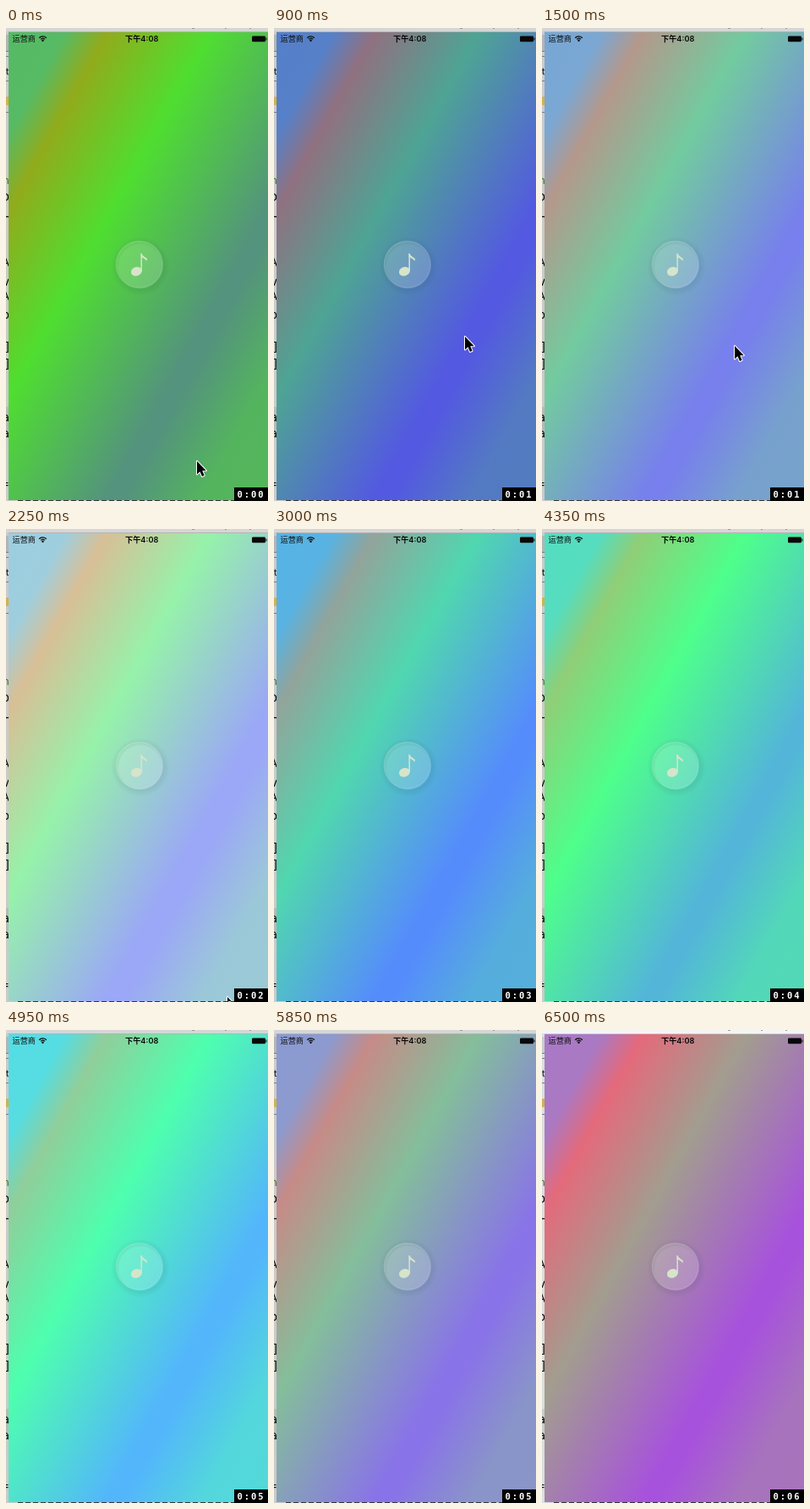
Recreate the animation shown at these times as an HTML page with a canvas. Size 310x558 px, loop 6.6 s.

```html
<!DOCTYPE html>
<html lang="zh">
<head>
<meta charset="utf-8">
<title>Colour player</title>
<style>
html, body { margin: 0; width: 100%; height: 100%; overflow: hidden; background: #ccc; }
canvas { display: block; }
</style>
</head>
<body>
<canvas id="stage" width="310" height="558"></canvas>
<script>
const ctx = document.getElementById('stage').getContext('2d');
const LOOP = 6600, LAST = 6500, STEP = 150;
const X = 3, Y = 5, W = 307, H = 552;
const CJK = '"Noto Sans CJK SC", "Noto Sans CJK", sans-serif';

// Backdrop colours; a null entry takes the mean of its neighbours.
const tones = [
  [0, [79, 145, 48]], [450, null], [900, [78, 87, 148]], [1350, null],
  [1950, [150, 165, 170]], [2400, null], [2850, [80, 138, 175]], [3450, null],
  [3900, [78, 180, 104]], [4350, null], [4950, [78, 180, 174]],
  [5400, [105, 147, 164]], [5850, [132, 113, 155]], [6500, [162, 80, 143]]
];
tones.forEach((tone, i) => {
  if (!tone[1]) tone[1] = tones[i - 1][1].map((c, k) => (c + tones[i + 1][1][k]) / 2);
});

// Tint added to the backdrop along the diagonal.
const tints = [
  [0, [6, 41, 54]], [0.11, [8, 41, 52]], [0.19, [66, 26, -20]],
  [0.39, [0, 77, 0]], [0.685, [5, 2, 77]], [0.72, [5, 2, 77]],
  [0.87, [5, 35, 46]], [1, [5, 37, 43]]
];

const clockTimes = [900, 1950, 3000, 3900, 4950, 6000];
const pointerPath = [
  [0, 226, 511], [450, 226, 440], [600, 226, 440], [900, 226, 364],
  [1500, 228, 375], [1650, 228, 375], [2250, 262, 552], [2550, 270, 570]
];
const fragments = [
  ['t', 55, 11], ['m', 184, 13], ['D', 204, 13], ['-', 227, 15], ['A', 281, 14],
  ['v', 304, 14], ['A', 321, 14], ['o', 343, 14], [']', 381, 14], [']', 401, 14],
  ['a', 464, 14], ['a', 483, 14], ['=', 543, 14]
];

function box(color, x, y, w, h) {
  ctx.fillStyle = color;
  ctx.fillRect(x, y, w, h);
}

function text(str, x, y, font, color) {
  ctx.font = font;
  ctx.fillStyle = color;
  ctx.fillText(str, x, y);
}

function drawDesktop(last) {
  box(last ? '#d9dfdc' : '#cacaca', 0, 0, 310, 558);
  box(last ? '#f5f5f5' : '#d6d6d6', 0, 0, 310, 4);
  box(last ? '#d0d0d0' : '#b4b4b4', 3, 4, 307, 1);
  box(last ? '#c9ccca' : '#b4b4b4', 0, 8, 3, 19);
  box(last ? '#c9ccca' : '#b8b8b8', 0, 447, 3, 28);
  box('#d5b04d', 0, 81, 3, 10);
  for (const y of [27, 33, 62, 99]) box('#777', 0, y, 3, 1);
  for (const [x, w] of [[220, 3], [259, 2], [288, 2]]) box('#999', x, 0, w, 1);
  ctx.save();
  ctx.beginPath();
  ctx.rect(0, 5, 3, 553);
  ctx.clip();
  ctx.textAlign = 'right';
  for (const [ch, y, size] of fragments) {
    text(ch, 4, y, `${size}px "DejaVu Sans", sans-serif`, ch === 'm' ? '#3c7a20' : '#0c0c0c');
  }
  ctx.restore();
  for (let x = 14; x < 270; x += 9) box('#333', x, 557, 6, 1);
}

function drawGradient(base) {
  const k = 2 / (1 / (W * W) + 1 / (H * H));
  const g = ctx.createLinearGradient(X, Y, X + k / W, Y + k / H);
  for (const [at, tint] of tints) {
    const rgb = base.map((c, i) => Math.max(0, Math.min(255, Math.round(c + tint[i]))));
    g.addColorStop(at, `rgb(${rgb})`);
  }
  box(g, X, Y, W, H);
}

function drawStatus() {
  text('运营商', 7.5, 16.3, `9.2px ${CJK}`, '#101010');
  text('下午4:08', 141, 16.3, `600 9.2px Inter, ${CJK}`, '#080808');
  ctx.strokeStyle = '#101010';
  ctx.lineWidth = 1.3;
  for (const r of [3.2, 5.7]) {
    ctx.beginPath();
    ctx.arc(43.5, 15.5, r, -Math.PI * 0.77, -Math.PI * 0.23);
    ctx.stroke();
  }
  ctx.beginPath();
  ctx.arc(43.5, 14.8, 1.2, 0, 7);
  ctx.fill();
  ctx.beginPath();
  ctx.roundRect(291, 9.5, 16, 6.8, 1.3);
  ctx.fill();
  ctx.fillRect(307.5, 11.5, 1, 3);
}

function drawButton() {
  const shade = ctx.createRadialGradient(159, 281, 25, 159, 281, 35);
  shade.addColorStop(0, 'rgba(0,40,40,0)');
  shade.addColorStop(0.25, 'rgba(0,40,40,.08)');
  shade.addColorStop(1, 'rgba(0,40,40,0)');
  box(shade, 120, 242, 78, 78);

  ctx.beginPath();
  ctx.arc(157.8, 279, 27.5, 0, 7);
  ctx.fillStyle = 'rgba(255,255,255,.17)';
  ctx.fill();
  ctx.strokeStyle = 'rgba(255,255,255,.15)';
  ctx.lineWidth = 1.4;
  ctx.stroke();

  ctx.fillStyle = ctx.strokeStyle = 'rgb(214,228,202)';
  ctx.beginPath();
  ctx.ellipse(154.4, 287.2, 6.6, 5.2, -0.35, 0, 7);
  ctx.fill();
  ctx.lineWidth = 1.5;
  ctx.beginPath();
  ctx.moveTo(160.2, 287);
  ctx.lineTo(160.2, 266);
  ctx.stroke();
  ctx.beginPath();
  ctx.moveTo(159.7, 265.5);
  ctx.quadraticCurveTo(162.7, 270, 167, 272.2);
  ctx.lineTo(166.5, 274.8);
  ctx.quadraticCurveTo(162.7, 270.8, 159.7, 270.5);
  ctx.fill();
}

function drawPointer(t) {
  const i = pointerPath.findIndex(p => p[0] > t);
  if (i < 0) return;
  const [t0, x0, y0] = pointerPath[i - 1], [t1, x1, y1] = pointerPath[i];
  const f = (t - t0) / (t1 - t0);
  ctx.save();
  ctx.beginPath();
  ctx.rect(0, 0, 310, 557);
  ctx.clip();
  ctx.translate(Math.round(x0 + (x1 - x0) * f), Math.round(y0 + (y1 - y0) * f));
  const arrow = new Path2D('M0 0V15.5L3.5 12.3L6 18L8.6 16.8L6.2 11.3H10.8Z');
  ctx.lineJoin = 'round';
  ctx.lineWidth = 2;
  ctx.strokeStyle = '#fff';
  ctx.stroke(arrow);
  ctx.fillStyle = '#000';
  ctx.fill(arrow);
  ctx.restore();
}

function drawClock(t) {
  box('#000', 270, 542, 40, 16);
  ctx.save();
  ctx.letterSpacing = '1.9px';
  const sec = clockTimes.filter(c => c <= t).length;
  text('0:0' + sec, 273.5, 553.6, 'bold 10.5px "DejaVu Sans Mono", monospace', '#fff');
  ctx.restore();
}

function draw(now) {
  const t = now % LOOP;
  const last = t >= LAST;
  const tick = last ? LAST : Math.floor(t / STEP) * STEP;
  drawDesktop(last);
  drawGradient(tones.filter(tone => tone[0] <= tick).pop()[1]);
  drawStatus();
  drawButton();
  drawPointer(tick);
  drawClock(tick);
}

let start;
function loop(now) {
  start ??= now;
  draw(now - start);
  requestAnimationFrame(loop);
}
draw(0);
requestAnimationFrame(loop);
</script>
</body>
</html>
```
